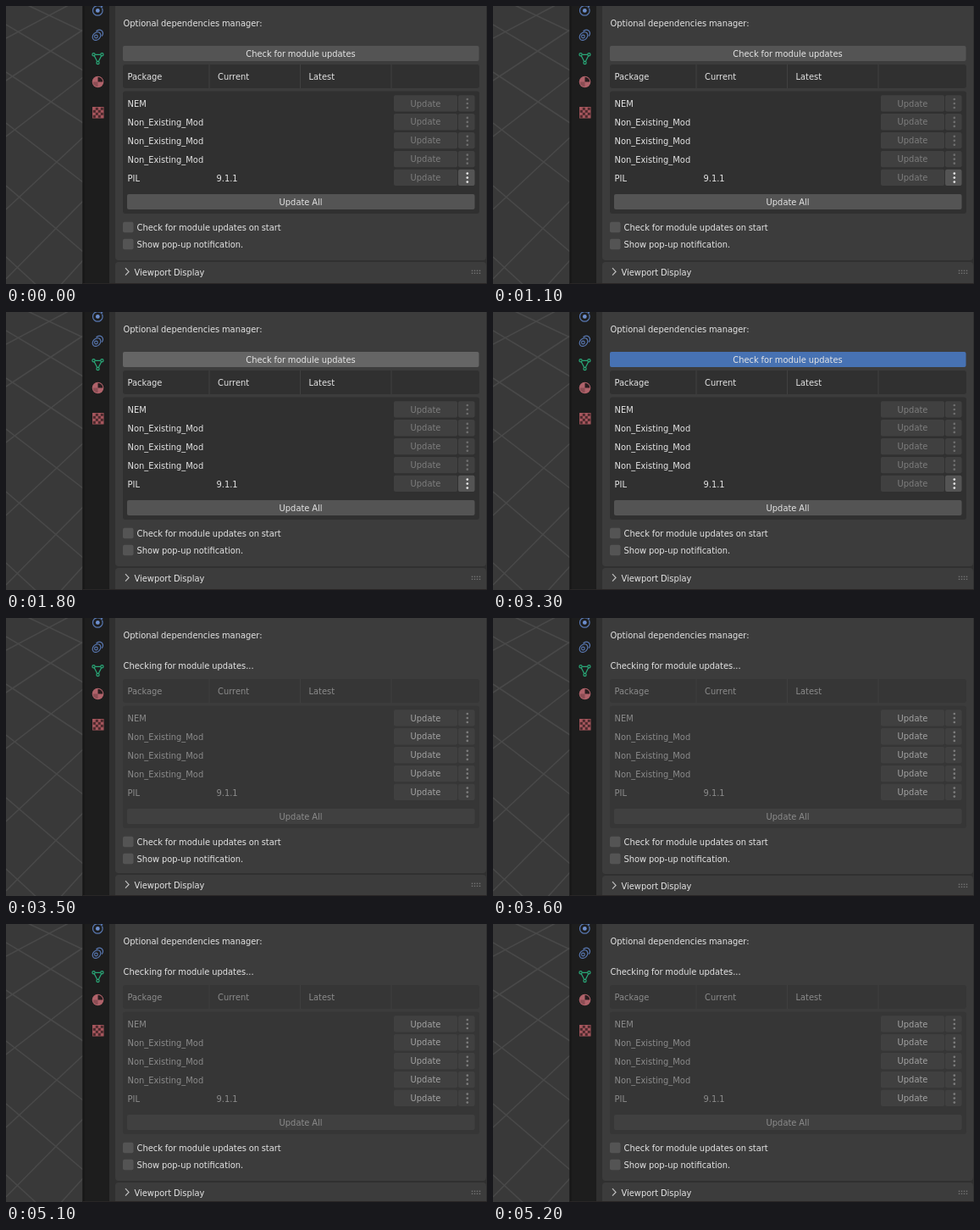
Recreate the animation shown at these times as an HTML page. Size 568 by 328 pixels, loop 8000 ms.

```html
<!DOCTYPE html>
<html lang="en">
<head>
<meta charset="utf-8">
<title>Optional dependencies manager</title>
<style>
  html, body { margin: 0; width: 100%; height: 100%; overflow: hidden; background: #393939; }
  svg { display: block; width: 568px; height: 328px; }
  text { font: 11px "DejaVu Sans Condensed", "DejaVu Sans", sans-serif; font-stretch: condensed; word-spacing: -.4px; fill: #e4e4e4; }
  .mid { text-anchor: middle; }
  .box { fill: #303030; }
  .rule { stroke: #414141; }
  .btn { fill: #545454; }
  .off .btn, .busy .btn { fill: #404040; }
  .off text { fill: #7d7d7d; }
  .off .dot { fill: #6e6e6e; }
  .dot { fill: #e4e4e4; }
  .busy .box { fill: #363636; }
  .busy .rule { stroke: #3f3f3f; }
  .busy text { fill: #8b8b8b; }
  .busy .row text.mid { fill: #a2a2a2; }
  .busy .dot { fill: #7c7c7c; }
</style>
</head>
<body>
<svg id="stage" viewBox="0 0 568 328" xmlns="http://www.w3.org/2000/svg">
  <rect width="568" height="328" fill="#303030"/>
  <rect width="91" height="328" fill="#393939"/>
  <g id="grid" stroke="#494949" stroke-width="1.5"></g>
  <rect x="90.5" width="38" height="328" fill="#1d1d1d"/>
  <rect x="90.5" width="2" height="328" fill="#171717"/>
  <rect x="122" width="7" height="328" fill="#303030"/>
  <rect x="129" width="438" height="328" fill="#3c3c3c"/>

  <g fill="none" stroke="#5877b0" stroke-width="1.2">
    <circle cx="108.3" cy="5.4" r="5.8"/>
    <circle cx="108.3" cy="5.4" r="2.4" fill="#6d8fce" stroke="none"/>
    <circle cx="112.8" cy=".8" r="1.7" fill="#5877b0" stroke="#1d1d1d" stroke-width=".7"/>
    <ellipse cx="107" cy="35.6" rx="5.4" ry="4.2" transform="rotate(-45 107 35.6)"/>
    <circle cx="106.4" cy="36" r="1.8"/>
    <path d="M106.5 29.8q3.2-3 6.4-.8 3.1 3 .2 6.6"/>
  </g>
  <g fill="#1d1d1d" stroke="#2aa878" stroke-width="1.2">
    <path d="M103.5 57.3H113.4L108.5 67Z"/>
    <circle cx="103.5" cy="57.3" r="1.6"/>
    <circle cx="113.4" cy="57.3" r="1.6"/>
    <circle cx="108.5" cy="67" r="1.6"/>
  </g>
  <circle cx="108.5" cy="89.5" r="6.8" fill="#b0626a"/>
  <path d="M108.5 89.5V83.7A5.8 5.8 0 0 1 114.3 89.5Z" fill="#2a1d1f"/>
  <path d="M108.5 89.5V95.3A5.8 5.8 0 0 1 102.7 89.5Z" fill="#8c4d54"/>
  <g id="checks"></g>

  <text x="138.5" y="23.6">Optional dependencies manager:</text>
  <g id="check">
    <rect id="checkBtn" x="138" y="47" width="420.5" height="18" rx="2"/>
    <text x="348" y="59.6" class="mid">Check for module updates</text>
  </g>
  <text id="status" x="138.5" y="59.6">Checking for module updates...</text>
  <g id="list"></g>
  <g id="options"></g>
  <g id="footer">
    <path d="M129 296q0 4 4 4H563q4 0 4-4V306q0-4-4-4H133q-4 0-4 4Z" fill="#303030"/>
    <path d="M141 309.2l4 4.2-4 4.2" fill="none" stroke="#c0c0c0" stroke-width="1.2"/>
    <text x="151.5" y="317.6">Viewport Display</text>
    <g id="grip" fill="#747474"></g>
  </g>
  <rect x="91" y="327" width="477" height="1" fill="#292626"/>
</svg>
<script>
const LOOP = 8000;
const el = id => document.getElementById(id);
const rect = (x, y, w, h, cls, rx = 2) =>
  `<rect x="${x}" y="${y}" width="${w}" height="${h}" rx="${rx}" class="${cls}"/>`;
const label = (x, y, s, cls = "") => `<text x="${x}" y="${y}" class="${cls}">${s}</text>`;

// Floor grid: each pair is the height at the left and right edge
const falling = [[-13, 30], [22, 76], [78, 138], [138, 208], [212, 290], [296, 380]];
const rising = [[38, -10], [88, 28], [154, 84], [240, 155], [322, 230], [400, 300]];
el("grid").innerHTML = [...falling, ...rising]
  .map(([a, b]) => `<path d="M0 ${a}L91 ${b}"/>`).join("");

let squares = '<rect x="102" y="119" width="13.5" height="13.5" fill="#a6565d"/>';
for (let i = 0; i < 16; i++) {
  const c = i % 4, r = i >> 2;
  if ((c + r) % 2) squares += `<rect x="${102.8 + c * 3}" y="${119.8 + r * 3}" width="3" height="3" fill="#4a292c"/>`;
}
el("checks").innerHTML = squares;

function row(name, i) {
  const y = 105.2 + i * 21.9, last = i === 4;
  const dots = [-5, 0, 5].map(d =>
    `<circle class="dot" cx="544.8" cy="${y + 9.8 + d}" r="1.35"/>`).join("");
  return label(143.5, y + 13.8, name) + (last ? label(248.5, y + 13.8, "9.1.1") : "") +
    `<g class="row"><g class="off">${rect(458, y, 75, 19.3, "btn")}${label(495.5, y + 13.3, "Update", "mid")}</g>` +
    `<g class="${last ? "" : "off"}">${rect(534, y, 19.5, 19.3, "btn")}${dots}</g></g>`;
}

el("list").innerHTML =
  rect(138, 69, 421, 28, "box", 3) +
  [240, 347.5, 455].map(x => `<path class="rule" d="M${x} 69V97"/>`).join("") +
  label(143.5, 87, "Package") + label(250, 87, "Current") + label(357.5, 87, "Latest") +
  rect(138, 100.5, 421, 144.5, "box", 3) +
  ["NEM", "Non_Existing_Mod", "Non_Existing_Mod", "Non_Existing_Mod", "PIL"].map(row).join("") +
  rect(143, 222, 410.5, 18, "btn") + label(348, 235, "Update All", "mid");

el("options").innerHTML = ["Check for module updates on start", "Show pop-up notification."]
  .map((s, i) => rect(138, 254.7 + i * 20, 12.5, 12.5, "btn") + label(154.5, 264.6 + i * 20, s)).join("");

let grip = "";
for (let i = 0; i < 8; i++)
  grip += `<rect x="${549.8 + (i % 4) * 3}" y="${311.6 + (i >> 2) * 3}" width="1.4" height="1.4"/>`;
el("grip").innerHTML = grip;

const shift = (id, y) => el(id).setAttribute("transform", `translate(0 ${y})`);

function render(t) {
  const busy = t >= 3500;
  el("check").style.display = busy ? "none" : "";
  el("status").style.display = busy ? "" : "none";
  el("checkBtn").setAttribute("fill", t < 1800 ? "#545454" : t < 3300 ? "#656565" : "#4772b3");
  el("list").setAttribute("class", busy ? "busy" : "");
  shift("list", busy ? 3 : 0);
  shift("options", busy ? 3 : 0);
  shift("footer", t < 3500 ? 0 : t < 3600 ? 1 : t < 3800 ? 2 : 3);
}

const start = performance.now();
function tick() {
  render((performance.now() - start) % LOOP);
  requestAnimationFrame(tick);
}
render(0);
requestAnimationFrame(tick);
</script>
</body>
</html>
```
